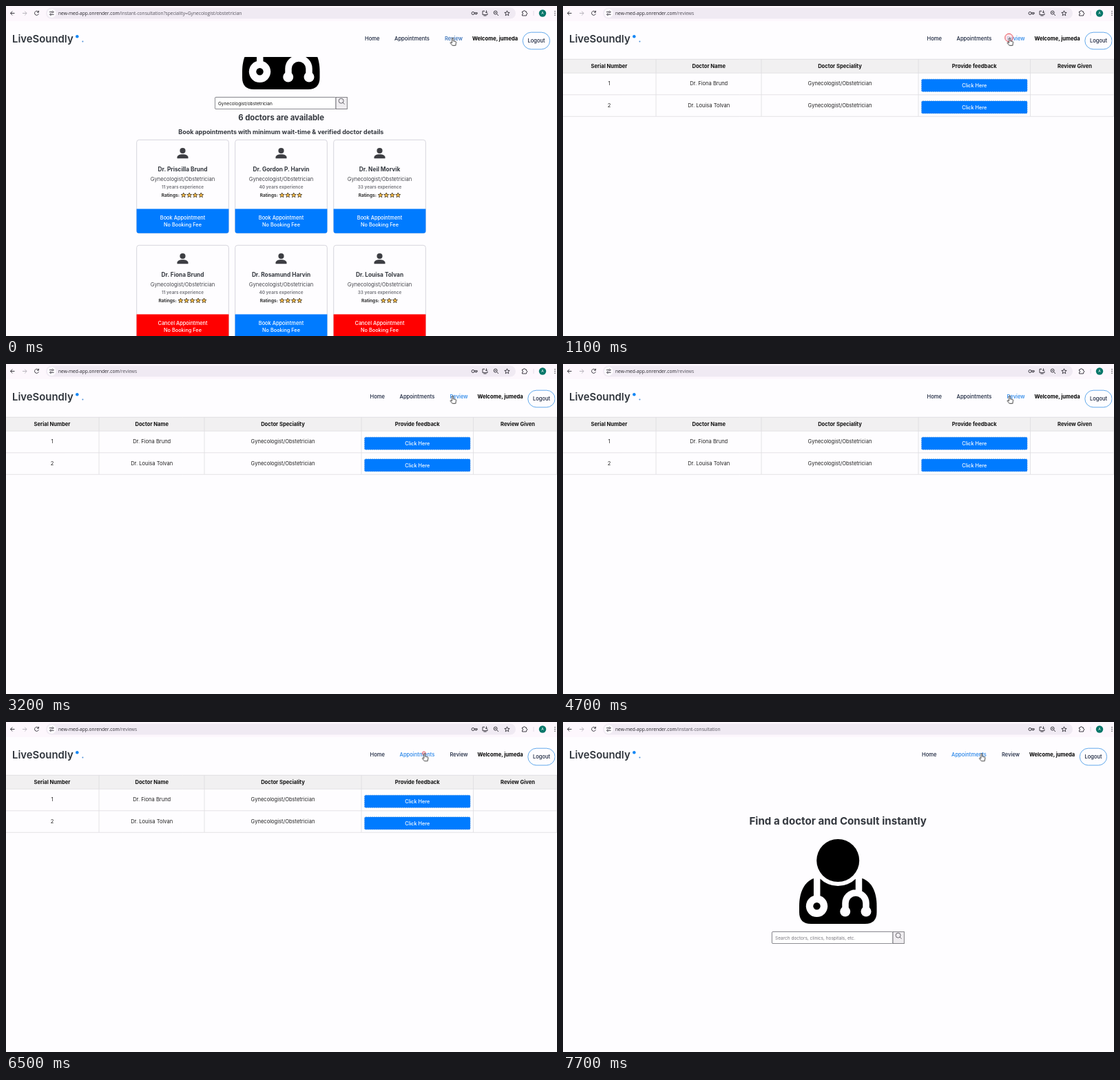
Recreate the animation shown at these times as an HTML page. Size 800x479 px, loop 8 s.

```html
<!DOCTYPE html>
<html lang="en">
<head>
<meta charset="utf-8">
<title>Book a doctor</title>
<style>
  html, body { margin: 0; width: 100%; height: 100%; overflow: hidden; background: #fefdff; }
  svg { display: block; width: 100vw; height: 100vh; font-family: Inter, "Open Sans", sans-serif; }
  .line { fill: none; stroke: #3f3d45; stroke-width: 1; }
  .url { font: 6.64px "Open Sans", "Noto Sans", sans-serif; }
</style>
</head>
<body>
<svg id="stage" viewBox="0 0 800 479"></svg>
<script>
const LOOP = 8000;
const REVIEWS_AT = 1100, SEARCH_AT = 6800;
const BLUE = '#007bff', INK = '#16213a', HOVER = '#2584e8', DARK = '#34383f';

const text = (x, y, size, str, { fill = '#222', weight = 400, anchor = 'middle', id = '' } = {}) =>
  `<text x="${x}" y="${y}" font-size="${size}" fill="${fill}" font-weight="${weight}" text-anchor="${anchor}"${id && ` id="${id}"`}>${str}</text>`;
const rect = (x, y, w, h, fill, extra = '') =>
  `<rect x="${x}" y="${y}" width="${w}" height="${h}" fill="${fill}" ${extra}/>`;
const circle = (x, y, r, fill, extra = '') =>
  `<circle cx="${x}" cy="${y}" r="${r}" fill="${fill}" ${extra}/>`;
const path = (d, extra = 'class="line"') => `<path d="${d}" ${extra}/>`;

function star(cx, cy, r) {
  const points = Array.from({ length: 10 }, (_, i) => {
    const a = i * Math.PI / 5 - Math.PI / 2, k = i % 2 ? r * 0.45 : r;
    return `${(cx + k * Math.cos(a)).toFixed(2)},${(cy + k * Math.sin(a)).toFixed(2)}`;
  });
  return `<polygon points="${points.join(' ')}" fill="#fbbd45" stroke="#403828" stroke-width=".8"/>`;
}

function browserBar() {
  const url = (id, tail) =>
    `<text id="${id}" class="url" x="76" y="12.8" fill="#25232a">new-med-app.onrender.com<tspan fill="#55525c">${tail}</tspan></text>`;
  return rect(0, 0, 800, 22, '#fdf7fd') + rect(58, 2.5, 682, 16, '#f0eaf3', 'rx="8"') +
    path('M12.5 10.5H6.5M9.3 7.6L6.4 10.5L9.3 13.4') +
    path('M24 10.5H30M27.2 7.6L30.1 10.5L27.2 13.4', 'fill="none" stroke="#b9b5bd"') +
    path('M47 8.6A3 3 0 1 0 47.4 11.3M47.5 6.8V9.2H45') +
    circle(66.2, 10.5, 6.5, '#fdfbfe') +
    path('M63 8.7H66M69 8.7H69.5M63 12.3H63.5M66.4 12.3H69.5') +
    circle(67.6, 8.7, 1.1, 'none', 'class="line"') + circle(64.9, 12.3, 1.1, 'none', 'class="line"') +
    url('urlDoctors', '/instant-consultation?speciality=Gynecologist/obstetrician') +
    url('urlReviews', '/reviews') + url('urlSearch', '/instant-consultation') +
    circle(678, 10.5, 2, 'none', 'class="line"') + path('M680 9.7H684.2V11.3H680M682.5 11V12.5') +
    path('M695 7.3H692V12.7H699V10.5M693.5 14H697.5M697.5 6.5V10M696 8.6L697.5 10.1L699 8.6') +
    circle(710.7, 9.6, 2.5, 'none', 'class="line"') + path('M712.5 11.4L715 14M709.5 9.6H712') +
    path('M727.5 6.8L728.5 9.3L731.2 9.5L729.1 11.2L729.8 13.9L727.5 12.4L725.2 13.9L725.9 11.2L723.8 9.5L726.5 9.3Z') +
    path('M749.5 8H751.3Q751.4 6.5 752.5 6.5T753.7 8H755.5V9.8Q757 10 757 11T755.5 12.2V14H749.5V12Q751 11.8 751 11T749.5 10Z') +
    path('M766 7V14', 'stroke="#e3dbe6"') + circle(779, 10.5, 5.2, '#08776a') +
    text(779, 12.3, 5, 'A', { fill: '#fff' }) +
    [7.7, 10.5, 13.3].map(y => circle(797, y, 0.75, '#3f3d45')).join('');
}

function header() {
  const item = (x, label, id, weight = 500, fill = INK) =>
    text(x, 50.3, 7.6, label, { anchor: 'start', id, weight, fill });
  return text(9, 53, 14.9, 'LiveSoundly', { anchor: 'start', weight: 600, fill: '#2f353c' }) +
    circle(103.3, 44.2, 2.3, '#1688f5') + circle(111.4, 51.4, 1, '#4a8fd6') +
    '<g id="nav">' + item(521, 'Home', 'home') + item(564, 'Appointments', 'appointments') +
    item(637, 'Review', 'review') + item(677, 'Welcome, jumeda', '', 700, '#000') +
    rect(750.3, 38.2, 39.3, 24.6, 'none', 'rx="12.3" stroke="#3b93e6" stroke-width=".8"') +
    text(770, 53, 7.5, 'Logout', { fill: INK, weight: 500 }) + '</g>';
}

function searchBlock(value, fill) {
  const white = 'fill="none" stroke="#fefdff" stroke-width="9.5"';
  return path('M364 227C350 232 343 248 343 267V276Q343 293 360 293H438.5Q455.5 293 455.5 276V267C455.5 248 449 232 434.5 227Z', '') +
    circle(399.2, 201, 37, '#fefdff') + circle(399.2, 201, 31, '#000') +
    path('M368.7 224V256', white) + circle(368.5, 267.3, 15.7, '#fefdff') + circle(368.5, 267.3, 5.2, '#000') +
    path('M429.5 224V248M410 274V263A15 15 0 0 1 440 263V274', white) +
    circle(409.7, 275, 7.5, '#fefdff') + circle(440, 275, 7.5, '#fefdff') +
    rect(303.4, 304.4, 175.6, 17.2, '#fff', 'rx="1.5" stroke="#62626a" stroke-width=".8"') +
    rect(479, 304.4, 16.3, 17.2, '#efedf0', 'stroke="#66666c" stroke-width=".8"') +
    `<g transform="translate(0 .3)" fill="none" stroke="#3f3d45" stroke-width=".75">${
      circle(486.6, 309.4, 3.5, 'none')}${path('M489.1 311.9L491.6 314.4', '')}</g>` +
    text(308, 315.6, 6.5, value, { anchor: 'start', fill });
}

function card(x, y, name, years, rating, booked) {
  const c = x + 66.5, start = c - 14 - 4.2 * rating;
  const stars = Array.from({ length: rating }, (_, i) => star(start + 32 + 8.5 * i, y + 80.7, 3.7)).join('');
  return rect(x - 0.3, y + 0.3, 133.6, 135.5, '#fefdff', 'rx="3.5" stroke="#d6d5dd"') +
    circle(c, y + 16, 4.1, '#3d3e43') +
    path(`M${c - 8} ${y + 27.2}V${y + 25.5}C${c - 8} ${y + 19.8} ${c + 8} ${y + 19.8} ${c + 8} ${y + 25.5}V${y + 27.2}Z`, 'fill="#3d3e43"') +
    text(c, y + 46, 8.3, name, { weight: 700, fill: DARK }) +
    text(c, y + 59.5, 7.6, 'Gynecologist/Obstetrician', { fill: '#45464c' }) +
    text(c, y + 71, 6.4, `${years} years experience`, { weight: 700, fill: '#7c7d83' }) +
    text(start, y + 82.9, 6.5, 'Ratings:', { weight: 700, fill: '#333', anchor: 'start' }) + stars +
    path(`M${x - 0.4} ${y + 100.5}h133.8v32.3q0 3-3 3h-127.8q-3 0-3-3z`, `fill="${booked ? '#ff0000' : BLUE}"`) +
    text(c, y + 115.7, 7.4, (booked ? 'Cancel' : 'Book') + ' Appointment', { fill: '#fff', weight: 500 }) +
    text(c, y + 126.2, 7.3, 'No Booking Fee', { fill: '#fff', weight: 500 });
}

function doctorsPage() {
  const doctors = [
    ['Dr. Priscilla Brund', 11, 4], ['Dr. Gordon P. Harvin', 40, 4], ['Dr. Neil Morvik', 33, 4],
    ['Dr. Fiona Brund', 11, 5, true], ['Dr. Rosamund Harvin', 40, 4], ['Dr. Louisa Tolvan', 33, 3, true]
  ];
  return '<g clip-path="url(#belowHeader)"><g transform="translate(0 -172)">' +
    searchBlock('Gynecologist/obstetrician', '#111') + '</g></g>' +
    text(399.5, 166, 11.3, '6 doctors are available', { weight: 700, fill: DARK }) +
    text(399.3, 186, 8.95, 'Book appointments with minimum wait-time &amp; verified doctor details', { weight: 700, fill: DARK }) +
    doctors.map((d, i) => card(190 + 143 * (i % 3), i < 3 ? 194 : 347, ...d)).join('');
}

function reviewsPage() {
  const titles = ['Serial Number', 'Doctor Name', 'Doctor Speciality', 'Provide feedback', 'Review Given'];
  const centers = [67, 211.7, 402, 597.3, 743];
  const row = (y, n, name) =>
    [n, name, 'Gynecologist/Obstetrician'].map((s, i) => text(centers[i], y + 18.4, 7.55, s)).join('') +
    rect(520.6, y + 9.3, 153.4, 18, BLUE, 'rx="1.5" stroke="#3d8fe4" stroke-width=".7" stroke-dasharray="2 1"') +
    text(597.3, y + 20.9, 7.3, 'Click Here', { fill: '#fff', weight: 500 });
  return rect(0, 77, 800, 20, '#f1f0f1') +
    path('M0 77.3H800M0 97.3H800M0 128.8H800M0 160.3H800M135 77V160M288 77V160M516 77V160M678.5 77V160M799.7 77V160', 'stroke="#dddce0" stroke-width=".8"') +
    titles.map((s, i) => text(centers[i], 89.6, 7.6, s, { weight: 700, fill: '#111' })).join('') +
    row(97, 1, 'Dr. Fiona Brund') + row(128.6, 2, 'Dr. Louisa Tolvan');
}

const searchPage = () =>
  text(399.2, 148.9, 15.15, 'Find a doctor and Consult instantly', { weight: 700, fill: DARK }) +
  searchBlock('Search doctors, clinics, hospitals, etc.', '#77767c');

function pointer() {
  const look = 'fill="#fff" stroke="#111" stroke-width=".8" stroke-linejoin="round"';
  return '<g id="pointer">' + circle(-1, 0, 5, '#ffdce0', 'id="ring" fill-opacity=".65" stroke="#e2454f" stroke-width="1"') +
    path('M-1 1.3A1 1 0 0 1 1 1.3V4.8L4 5.4Q5.3 5.8 5.1 7L4.3 11.3H-.4L-3.2 7.9Q-3.4 6.5-2.1 6.7L-1 7.6Z', `id="hand" ${look}`) +
    path('M0 0V10L2.3 7.9L3.8 11.2L5.3 10.5L3.8 7.3H7Z', `id="arrow" ${look}`) + '</g>';
}

const $ = id => document.getElementById(id);
$('stage').innerHTML =
  '<clipPath id="belowHeader"><rect y="74" width="800" height="405"/></clipPath>' +
  rect(0, 0, 800, 479, '#fefdff') + browserBar() + header() +
  `<g id="doctors">${doctorsPage()}</g><g id="reviews">${reviewsPage()}</g><g id="search">${searchPage()}</g>` +
  pointer();

// Each table holds [time, value]; a value stays until the next entry.
function play(id, property, table) {
  const frames = table.map(([time, value]) => ({ offset: time / LOOP, easing: 'step-end', [property]: value }));
  frames.push({ offset: 1, [property]: table.at(-1)[1] });
  $(id).animate(frames, { duration: LOOP, iterations: Infinity });
}
const show = (id, from, to) => play(id, 'opacity',
  [...(from > 0 ? [[0, 0]] : []), [from, 1], ...(to < LOOP ? [[to, 0]] : [])]);
const at = (x, y) => `translate(${x}px, ${y}px)`;

for (const id of ['doctors', 'urlDoctors']) show(id, 0, REVIEWS_AT);
for (const id of ['reviews', 'urlReviews']) show(id, REVIEWS_AT, SEARCH_AT);
for (const id of ['search', 'urlSearch']) show(id, SEARCH_AT, LOOP);

play('nav', 'transform', [[0, at(0, 0)], [REVIEWS_AT, at(7.5, 0)], [SEARCH_AT, at(0, 0)]]);
play('review', 'fill', [[0, '#2c68b4'], [100, HOVER], [6000, INK]]);
play('appointments', 'fill', [[0, INK], [6200, HOVER]]);
play('pointer', 'transform', [
  [0, at(648.5, 46)], [5900, at(646, 46)], [6000, at(638, 45.7)], [6100, at(627, 45.3)],
  [6200, at(617, 45)], [6300, at(610, 45)], [6400, at(607.8, 45.3)]
]);
play('hand', 'opacity', [[0, 1], [6000, 0], [6200, 1]]);
play('arrow', 'opacity', [[0, 0], [6000, 1], [6200, 0]]);
play('ring', 'opacity', [[0, 0], [900, 1], [1200, 0.6], [1300, 0], [6500, 1], [6900, 0.6], [7000, 0]]);
play('ring', 'r', [
  [0, '2.3px'], [1000, '4.3px'], [1100, '5.8px'], [1200, '7px'],
  [1300, '2.3px'], [6700, '4.3px'], [6800, '5.8px'], [6900, '7px']
]);
</script>
</body>
</html>
```
